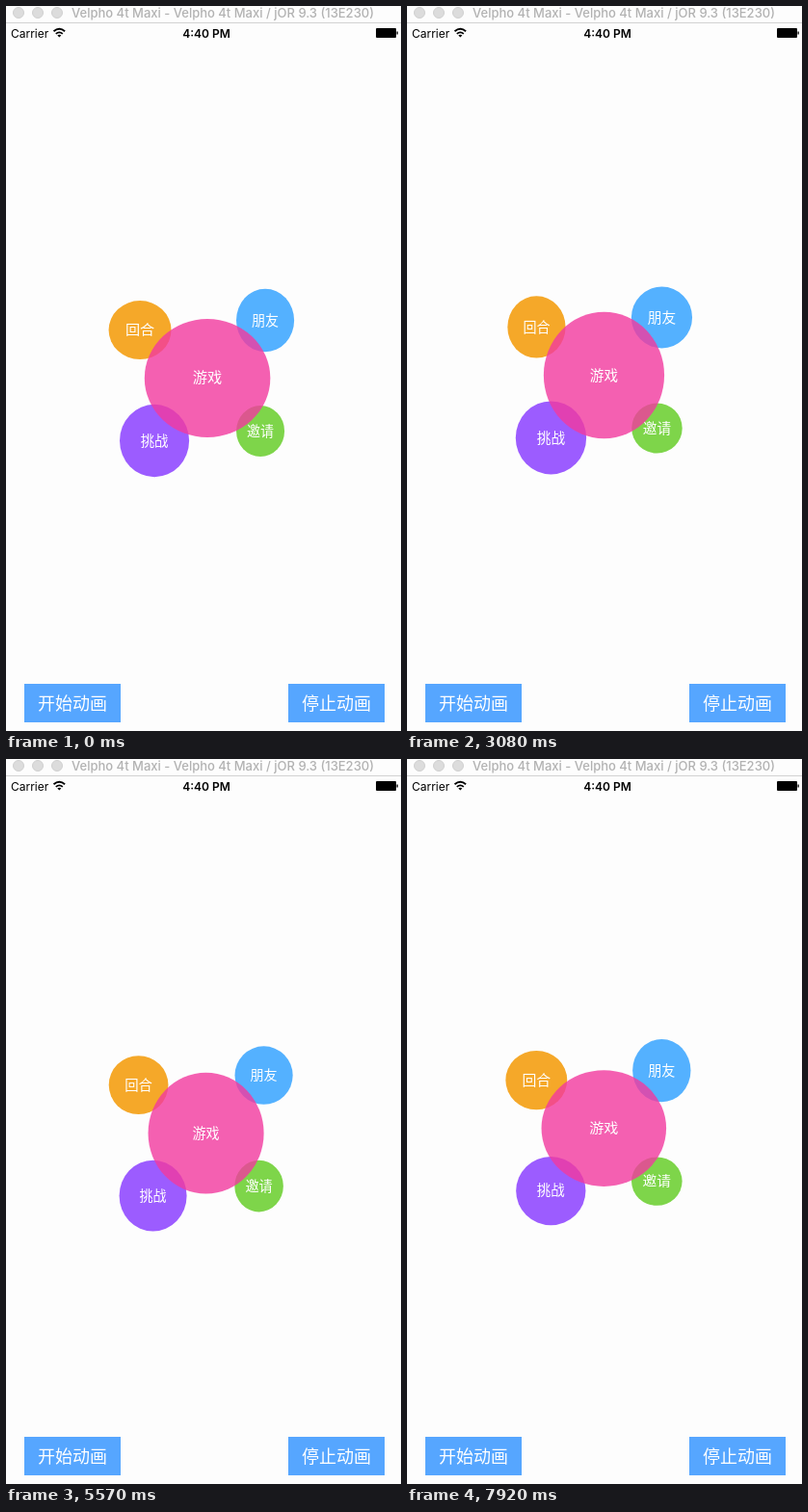
Write an HTML page that moves like this. It is 410x753 px and loops after 8000 ms.

```html
<!DOCTYPE html>
<html lang="zh-CN">
<head>
<meta charset="utf-8">
<style>
  html, body { margin: 0; width: 100%; height: 100%; overflow: hidden; background: #fdfdfd; }
  svg { display: block; width: 100vw; height: 100vh; }
  text { font-family: Inter, "Noto Sans CJK SC", "Noto Sans CJK", sans-serif; }
  .label { fill: #fff; text-anchor: middle; font-family: "Noto Sans CJK SC", "Noto Sans CJK", sans-serif; font-weight: 300; }
</style>
</head>
<body>
<svg id="stage" viewBox="0 0 410 753">
  <g fill="#dcdcdc" stroke="#d0d0d0">
    <circle cx="13" cy="7" r="5.5"/>
    <circle cx="33" cy="7" r="5.5"/>
    <circle cx="53" cy="7" r="5.5"/>
  </g>
  <text x="68" y="12" font-size="13" font-weight="500" fill="#b2b2b2">Velpho 4t Maxi - Velpho 4t Maxi / jOR 9.3 (13E230)</text>
  <path d="M0 17.5H410" stroke="#d2d2d2"/>

  <text x="5" y="33" font-size="12">Carrier</text>
  <g fill="none" stroke="#000" stroke-width="1.8">
    <path d="M49.5 26.3Q55.3 21.3 61.1 26.3"/>
    <path d="M51.8 28.9Q55.3 25.8 58.8 28.9"/>
  </g>
  <path d="M53.3 30.5Q55.3 28.9 57.3 30.5L55.3 32.6Z"/>
  <text x="208" y="33" font-size="12" font-weight="600" text-anchor="middle">4:40 PM</text>
  <rect x="384" y="23" width="21" height="10" rx="1"/>
  <rect x="405.5" y="26.5" width="1.3" height="3"/>

  <g id="bubbles"></g>

  <g fill="#56a6ff">
    <rect x="19" y="704" width="100" height="40"/>
    <rect x="293" y="704" width="100" height="40"/>
  </g>
  <g class="label" font-size="18">
    <text x="69" y="731">开始动画</text>
    <text x="343" y="731">停止动画</text>
  </g>
</svg>
<script>
const CENTER = { x: 206.1, y: 386 };
const ORBIT_RADIUS = 3, ORBIT_SECONDS = 5;
const LOOP_MS = 8000, STEP_MS = 146.4, STEP_LEAD_MS = 4;
const STEP_SECONDS = 0.15, START_SECONDS = 10.14;

// dx, dy: offset from the centre; periodX, periodY: seconds per swell on each axis
const bubbles = [
  { label: '回合', dx: -70, dy: -50, size: 60, color: '#f5a829', periodX: 7, periodY: 2 },
  { label: '朋友', dx: 60, dy: -60, size: 60, color: '#54b1ff', periodX: 2, periodY: 4 },
  { label: '挑战', dx: -55, dy: 65, size: 70, color: '#9c5cff', periodX: 8, periodY: 3 },
  { label: '邀请', dx: 55, dy: 55, size: 50, color: '#7ed54a', periodX: 5, periodY: 6 },
  { label: '游戏', dx: 0, dy: 0, size: 120, color: '#f33a9f', alpha: 0.8, periodX: 4, periodY: 9 }
];

function addSvg(parent, tag, attributes) {
  const node = document.createElementNS('http://www.w3.org/2000/svg', tag);
  for (const name in attributes) node.setAttribute(name, attributes[name]);
  return parent.appendChild(node);
}

const layer = document.getElementById('bubbles');
for (const b of bubbles) {
  b.node = addSvg(layer, 'g', {});
  addSvg(b.node, 'circle', { r: b.size / 2, fill: b.color, 'fill-opacity': b.alpha || 1 });
  addSvg(b.node, 'text', { class: 'label', y: 4.8, 'font-size': 14 }).textContent = b.label;
}

// cubic-bezier(.42, 0, .58, 1), solved by bisection
function easeInOut(x) {
  let low = 0, high = 1, s;
  for (let i = 0; i < 20; i++) {
    s = (low + high) / 2;
    const bx = 1.26 * s * (1 - s) ** 2 + 1.74 * s * s * (1 - s) + s ** 3;
    if (bx < x) low = s; else high = s;
  }
  return s * s * (3 - 2 * s);
}

const linear = x => x;

// 1 -> 1.1 -> 1 over each period
function swell(seconds, period, ease) {
  const progress = ease(seconds / period % 1);
  return 1 + 0.1 * (1 - Math.abs(2 * progress - 1));
}

function draw() {
  const step = Math.floor((performance.now() % LOOP_MS + STEP_LEAD_MS) / STEP_MS);
  const seconds = START_SECONDS + step * STEP_SECONDS;
  const angle = 2 * Math.PI * seconds / ORBIT_SECONDS;
  const x = CENTER.x + ORBIT_RADIUS * Math.cos(angle);
  const y = CENTER.y + ORBIT_RADIUS * Math.sin(angle);
  for (const b of bubbles) {
    const sx = swell(seconds, b.periodX, easeInOut);
    const sy = swell(seconds, b.periodY, linear);
    b.node.setAttribute('transform', `translate(${x + b.dx} ${y + b.dy}) scale(${sx} ${sy})`);
  }
  requestAnimationFrame(draw);
}
draw();
</script>
</body>
</html>
```
